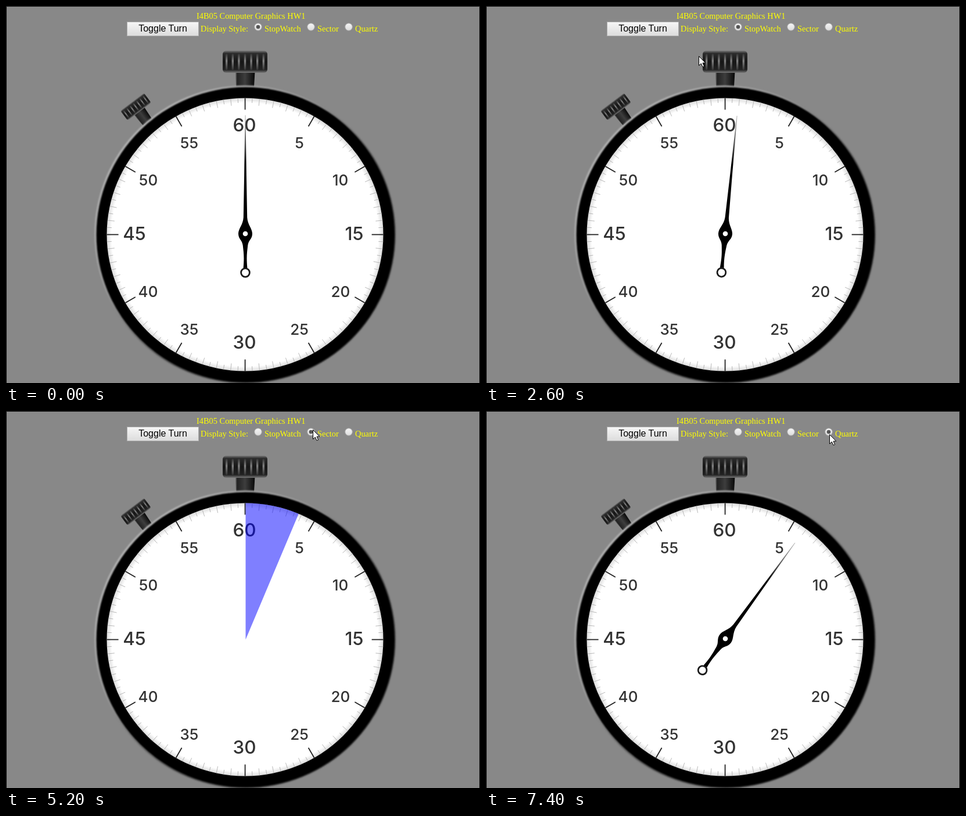
Recreate the animation shown at these times as an HTML page. Size 816 by 649 pixels, loop 8000 ms.

```html
<!DOCTYPE html>
<html lang="en">
<head>
<meta charset="utf-8">
<title>Stopwatch</title>
<style>
  html, body { margin: 0; width: 100%; height: 100%; overflow: hidden; background: #888; }
  svg { display: block; width: 816px; height: 649px; }
  .label { font: 14.4px "Liberation Serif", serif; fill: #ff0; }
  .button { font: 16px "Liberation Sans", sans-serif; text-anchor: middle; }
  .digits { font-family: Inter, sans-serif; font-weight: 500; fill: #333; text-anchor: middle; }
</style>
</head>
<body>
<svg viewBox="0 0 816 649">
  <defs>
    <linearGradient id="face" x2="0" y2="1">
      <stop stop-color="#f6f6f6"/><stop offset="1" stop-color="#dcdcdc"/>
    </linearGradient>
    <linearGradient id="pressed" x2="0" y2="1">
      <stop stop-color="#d4d4d4"/><stop offset="1" stop-color="#eee"/>
    </linearGradient>
    <linearGradient id="rim" x2="1" y2="1">
      <stop offset=".12" stop-color="#b4b4b4"/><stop offset=".35" stop-color="#999"/>
      <stop offset=".6" stop-color="#555"/><stop offset="1" stop-color="#444"/>
    </linearGradient>
    <linearGradient id="crown" x2="0" y2="1">
      <stop stop-color="#777"/><stop offset=".12" stop-color="#2c2c2c"/>
      <stop offset=".5" stop-color="#161616"/><stop offset=".86" stop-color="#222"/>
      <stop offset="1" stop-color="#777"/>
    </linearGradient>
    <linearGradient id="ridge" x2="0" y2="1">
      <stop stop-color="#333"/><stop offset=".45" stop-color="#808080"/><stop offset="1" stop-color="#333"/>
    </linearGradient>
    <linearGradient id="stem">
      <stop stop-color="#888"/><stop offset=".1" stop-color="#222"/>
      <stop offset=".5" stop-color="#3d3d3d"/><stop offset="1" stop-color="#080808"/>
    </linearGradient>
    <linearGradient id="blade" gradientUnits="userSpaceOnUse" x1="0" y1="-204" x2="0" y2="-120">
      <stop stop-color="#888" stop-opacity=".6"/><stop offset=".55" stop-color="#555"/><stop offset="1"/>
    </linearGradient>
    <radialGradient id="dial">
      <stop offset=".965" stop-color="#fff"/><stop offset="1" stop-color="#ddd"/>
    </radialGradient>
    <filter id="soften"><feGaussianBlur stdDeviation=".9"/></filter>
    <g id="knob">
      <path d="M-17 17H17L14.5 60H-14.5Z" fill="url(#stem)"/>
      <rect x="-38.5" y="-19" width="77" height="38" rx="6" fill="url(#crown)"/>
      <g id="ridges"></g>
    </g>
  </defs>

  <rect width="816" height="649" fill="#888"/>
  <path d="M.5 649V.5H815.5V649" fill="none" stroke="#000"/>

  <text class="label" x="328" y="22">I4B05 Computer Graphics HW1</text>
  <rect id="button" x="208.5" y="27.5" width="123" height="24" fill="url(#face)"/>
  <text class="button" x="270" y="44">Toggle Turn</text>
  <text class="label" x="335" y="44">Display Style:</text>
  <g id="radios"></g>

  <use href="#knob" x="411.5" y="96"/>
  <use href="#knob" transform="translate(223.5 173.5) rotate(-37) scale(.66 .55)"/>
  <ellipse cx="411.5" cy="393.3" rx="259.5" ry="256.5" fill="url(#rim)" filter="url(#soften)"/>
  <ellipse cx="412.3" cy="393.8" rx="256.7" ry="254" fill="#000" filter="url(#soften)"/>
  <ellipse cx="411.5" cy="393.5" rx="238" ry="235" fill="url(#dial)"/>
  <g id="ticks"></g>
  <g id="numbers" class="digits"></g>

  <path id="sector" fill="#00f" fill-opacity=".5"/>
  <g id="hand">
    <path fill="url(#blade)" d="M-.5-204H.5L1.9-100L3.2-28C4-15 12-9 12 0C12 9 5.5 11 4.3 20C3 32 1.6 40 3.4 59H-3.4C-1.6 40-3 32-4.3 20C-5.5 11-12 9-12 0C-12-9-4-15-3.2-28L-1.9-100Z"/>
    <circle r="4.3" fill="#fff"/>
    <circle cy="67" r="7.4" fill="#fff" stroke="#1a1a1a" stroke-width="2.8"/>
  </g>
  <path id="cursor" d="M.5.5V16.5L4.3 13L7 18.8L9.6 17.7L7 12H11.8Z" fill="#fff" stroke="#000"/>
</svg>

<script>
const LOOP = 8000, STEP = 100;
const CLICK = { press: 1600, release: 1800, sector: 4500, quartz: 7300 };
const CENTER = { x: 412.5, y: 393.5 };

// [ms, x, y]
const cursorPath = [
  [200, 784, 272], [400, 531, 278], [600, 343, 227], [800, 270, 140],
  [1000, 251, 100], [1300, 272, 62], [1600, 285, 41], [1900, 285, 41],
  [2600, 366, 86], [3500, 450, 77], [4200, 528, 32], [6500, 528, 32],
  [7000, 591, 42], [7200, 592, 40], [7400, 591, 40]
];
// [ms, degrees]
const anglePath = [[1700, 0], [1800, .3], [2600, 5.65], [3500, 11.4], [4500, 18.3], [6000, 28.05], [7400, 37.3]];

const $ = id => document.getElementById(id);

function add(parent, tag, attrs, text = "") {
  const node = document.createElementNS("http://www.w3.org/2000/svg", tag);
  for (const name in attrs) node.setAttribute(name, attrs[name]);
  node.textContent = text;
  return parent.appendChild(node);
}

function sample(path, t) {
  const next = path.findIndex(row => row[0] > t);
  if (next === 0) return path[0].slice(1);
  if (next < 0) return path.at(-1).slice(1);
  const a = path[next - 1], b = path[next];
  const k = (t - a[0]) / (b[0] - a[0]);
  return a.slice(1).map((v, i) => v + (b[i + 1] - v) * k);
}

for (let i = -3; i <= 3; i++) {
  add($("ridges"), "rect", { x: i * 10.6 - 1.7, y: -14, width: 3.4, height: 28, rx: 1.5, fill: "url(#ridge)" });
}

const dots = [[434, 445, "StopWatch"], [525, 536, "Sector"], [590, 601, "Quartz"]].map(([cx, x, name]) => {
  add($("radios"), "circle", { cx, cy: 36, r: 6.3, fill: "url(#face)", stroke: "#a6a6a6" });
  add($("radios"), "text", { class: "label", x, y: 44 }, name);
  return add($("radios"), "circle", { cx, cy: 36, r: 3.3, fill: "#555" });
});

for (let i = 0; i < 120; i++) {
  const major = i % 10 === 0;
  const length = major ? 20 : i % 2 ? 8 : 12;
  const a = i * Math.PI / 60, s = Math.sin(a), c = Math.cos(a);
  add($("ticks"), "line", {
    x1: 411.6 + 238 * s, y1: 393.5 - 235 * c,
    x2: 411.6 + (238 - length) * s, y2: 393.5 - (235 - length) * c,
    stroke: major ? "#222" : "#b0b0b0", "stroke-width": major ? 1.8 : .9
  });
}

// Right half of the dial; the left half mirrors it.
[[0, 205], [94.5, 236], [165, 300], [189, 392], [165.5, 492], [94.5, 557], [0, 579]].forEach(([dx, y], i) => {
  const size = i % 3 ? 26 : 31.5;
  const put = (x, n) => add($("numbers"), "text", { x, y: y + size * .364, "font-size": size }, n);
  put(410.5 + dx, i * 5 || 60);
  if (dx) put(410 - dx, 60 - i * 5);
});

function draw(t) {
  const mode = t >= CLICK.quartz ? 2 : t >= CLICK.sector ? 1 : 0;
  const [angle] = sample(anglePath, t);
  const shown = mode === 2 ? Math.floor(angle / 6) * 6 : angle;
  const [x, y] = sample(cursorPath, t);

  dots.forEach((dot, i) => dot.style.display = i === mode ? "" : "none");

  const rad = angle * Math.PI / 180, r = 235;
  $("sector").style.display = mode === 1 ? "" : "none";
  $("sector").setAttribute("d", `M${CENTER.x} ${CENTER.y}v${-r}A${r} ${r} 0 0 1 ${CENTER.x + r * Math.sin(rad)} ${CENTER.y - r * Math.cos(rad)}Z`);
  $("hand").style.display = mode === 1 ? "none" : "";
  $("hand").setAttribute("transform", `translate(412 392) rotate(${shown})`);

  const hover = t >= 200 && x > 208 && x < 332 && y > 27 && y < 52;
  const down = t >= CLICK.press && t < CLICK.release;
  $("button").setAttribute("fill", `url(#${down ? "pressed" : "face"})`);
  $("button").setAttribute("stroke", hover ? "#777" : "#adadad");

  $("cursor").style.display = t < 200 ? "none" : "";
  $("cursor").setAttribute("transform", `translate(${Math.round(x)} ${Math.round(y)})`);
}

const start = performance.now();
function tick() {
  const t = (performance.now() - start) % LOOP;
  draw(Math.floor(t / STEP) * STEP);
  requestAnimationFrame(tick);
}
tick();
</script>
</body>
</html>
```
